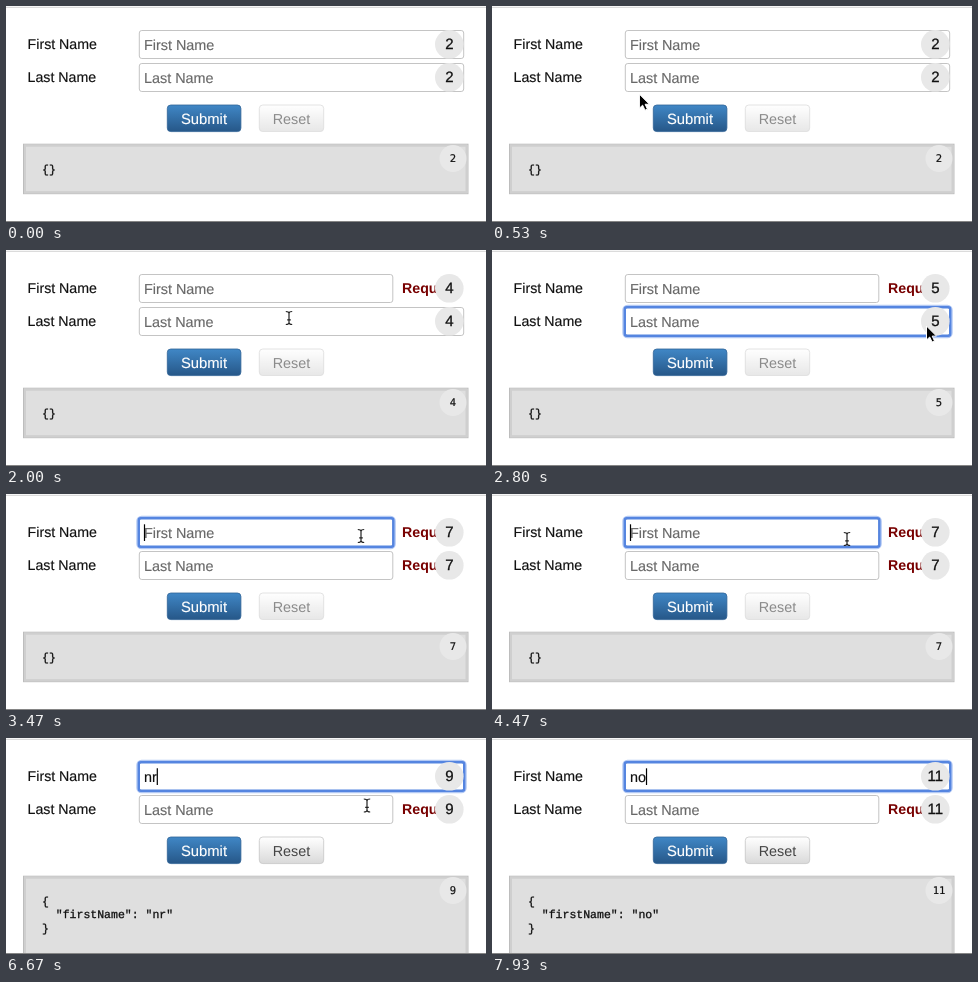
These frames come from a looping animation (480x216 px, 8000 ms). An HTML page:

```html
<!DOCTYPE html>
<html lang="en">
<head>
<meta charset="utf-8">
<title>Form validation</title>
<style>
  html, body { margin: 0; width: 480px; height: 216px; overflow: hidden; background: #fff; }
  svg { display: block; }
  text { font: 14.4px "Liberation Sans", Arial, sans-serif; fill: #111; white-space: pre;
    text-rendering: geometricPrecision; }
  .label { font-size: 14.2px; stroke: #111; stroke-width: .15px; }
  .hint { fill: #686868; stroke: #686868; stroke-width: .15px; }
  .value { stroke: #111; stroke-width: .15px; }
  .error { font-size: 14.2px; font-weight: bold; fill: #780000; }
  .mid { text-anchor: middle; }
  .count { font-size: 15px; stroke: #111; stroke-width: .3px; }
  .code { font: 11.5px "Liberation Mono", "Courier New", monospace; stroke: #111; stroke-width: .3px; }
  .small { font: 10.5px "DejaVu Sans Mono", monospace; stroke: #111; stroke-width: .2px; }
  .badge { fill: #e8e8e8; }
  .box { fill: #fff; stroke: #c4c4c4; }
  .ring { fill: none; stroke: #5585e0; stroke-width: 2.4; }
  .glow { fill: none; stroke: #b3c9f4; stroke-width: 4.4; }
</style>
</head>
<body>
<svg width="480" height="216" viewBox="0 0 480 216">
  <defs>
    <linearGradient id="blue" x2="0" y2="1">
      <stop stop-color="#4087c6"/><stop offset="1" stop-color="#265788"/>
    </linearGradient>
    <linearGradient id="gray" x2="0" y2="1">
      <stop stop-color="#fff"/><stop offset="1" stop-color="#d9d9d9"/>
    </linearGradient>
    <clipPath id="cut"><path d="M0 0H448V216H0Z"/></clipPath>
  </defs>
  <path d="M0 1.3H480" stroke="#d2d2d2"/>

  <text class="label" x="21.6" y="43">First Name</text>
  <text class="label" x="21.6" y="76">Last Name</text>
  <g id="fields"></g>

  <rect x="161.3" y="99" width="73.6" height="26.6" rx="3.5" fill="url(#blue)" stroke="#2f6296" stroke-width=".8"/>
  <text class="mid" x="198" y="117.8" style="font-size:14.8px;fill:#fff;stroke:#fff;stroke-width:.15px">Submit</text>
  <g id="reset">
    <rect x="253.3" y="99" width="64.4" height="26.6" rx="3.5" fill="url(#gray)" stroke="#c6c6c6" stroke-width=".8"/>
    <text class="mid" x="285.5" y="117.8" style="fill:#444">Reset</text>
  </g>

  <g id="panel">
    <rect id="back" x="17.5" y="138.2" width="444.5" fill="#dfdfdf" stroke="#bdbdbd"/>
    <rect id="shade" x="19" y="139.7" width="441.5" fill="none" stroke="#cfcfcf" stroke-width="2"/>
    <text class="code" x="36" y="166.7"></text>
    <text class="code" x="36" y="180.2"></text>
    <text class="code" x="36" y="193.8"></text>
    <circle class="badge" cx="447" cy="152.5" r="13.5"/>
    <text class="small mid" x="447" y="156.2"></text>
  </g>
  <path d="M0 215.5H480" stroke="#858585"/>

  <path id="caret" stroke="#000" stroke-width="1.2"/>
  <path id="beam" d="M-3.2 -6.5Q0 -6.5 0 -4.5Q0 -6.5 3.2 -6.5M0 -5V5M-3.2 6.5Q0 6.5 0 4.5Q0 6.5 3.2 6.5M-1.8 1.8H1.8"
        fill="none" stroke="#222" stroke-width="1.2"/>
  <path id="arrow" d="M0 0V14L3.2 11L5.6 16L8 15L5.7 10.1H10Z" fill="#000" stroke="#fff"/>
</svg>
<script>
const LOOP = 8000, STEP = 1000 / 15;

// time, renders, focused field, first error, last error, typed value
const STATES = [
  [0, 2, 0, 0, 0, ''],
  [1000, 3, 1, 0, 0, ''],
  [2000, 4, 0, 1, 0, ''],
  [2067, 5, 2, 1, 0, ''],
  [3467, 7, 1, 1, 1, ''],
  [4800, 8, 1, 0, 1, 'n'],
  [5467, 9, 1, 0, 1, 'nr'],
  [7467, 10, 1, 0, 1, 'n'],
  [7933, 11, 1, 0, 1, 'no']
];
const CARET_ON = [[1000, 1467], [2067, 2533], [3000, 3267], [3467, 3933],
  [4467, 5267], [5467, 5933], [6467, 6933], [7467, 8000]];
const POINTER_ON = [[133, 4800], [5800, 7467]];
const POINTER = [
  [133, 118, 113], [400, 142, 100], [867, 169, 41], [1400, 169, 41],
  [1733, 283, 68], [2400, 283, 68], [2667, 445, 77], [2800, 434.5, 76],
  [2867, 434.5, 76], [3267, 355, 42], [3667, 355, 42], [3933, 355, 45],
  [6400, 355, 45], [6667, 361, 67.5], [7000, 361, 67.5], [7067, 365, 63]
];

const $ = id => document.getElementById(id);
const set = (el, attrs) => { for (const k in attrs) el.setAttribute(k, attrs[k]); };
const show = (el, on) => set(el, { visibility: on ? 'visible' : 'hidden' });
const within = (spans, t) => spans.some(([a, b]) => t >= a && t < b);

function makeField(hint, y) {
  const g = document.createElementNS('http://www.w3.org/2000/svg', 'g');
  g.innerHTML = `
    <rect class="glow" x="132.5" y="${y}" height="29" rx="3"/>
    <rect class="box" x="133.3" y="${y + .5}" height="28" rx="2.5"/>
    <rect class="ring" x="132.8" y="${y + .3}" height="28.4" rx="2"/>
    <text class="hint" x="138" y="${y + 20}">${hint}</text>
    <text class="value" x="138" y="${y + 20}"></text>
    <text class="error" x="396" y="${y + 19}" clip-path="url(#cut)">Required</text>
    <circle class="badge" cx="443.3" cy="${y + 14.3}" r="14.3"/>
    <text class="count mid" x="443.4" y="${y + 19.2}"></text>`;
  $('fields').append(g);
  const part = name => g.querySelector('.' + name);
  return { y, part, draw(count, focused, error, value) {
    const width = error ? 253.5 : 324.4;
    set(part('box'), { width });
    set(part('ring'), { width: width + 1 });
    set(part('glow'), { width: width + 1.6 });
    show(part('ring'), focused);
    show(part('glow'), focused);
    show(part('hint'), !value);
    show(part('error'), error);
    part('value').textContent = value;
    part('count').textContent = count;
  } };
}
const fields = [makeField('First Name', 24), makeField('Last Name', 57)];

function drawPanel(count, value) {
  const height = value ? 90 : 49.5;
  const lines = value ? ['{', `  "firstName": "${value}"`, '}'] : ['{}', '', ''];
  set($('back'), { height });
  set($('shade'), { height: height - 3 });
  document.querySelectorAll('.code').forEach((el, i) => el.textContent = lines[i]);
  document.querySelector('.small').textContent = count;
}

function pointerAt(t) {
  const i = POINTER.findIndex(p => p[0] > t);
  if (i < 0) return POINTER[POINTER.length - 1].slice(1);
  if (!i) return POINTER[0].slice(1);
  const [a, ax, ay] = POINTER[i - 1], [b, bx, by] = POINTER[i];
  const u = (t - a) / (b - a), e = u * u * (3 - 2 * u);
  return [ax + (bx - ax) * e, ay + (by - ay) * e];
}

function drawPointer(t, wide) {
  const [x, y] = pointerAt(t), on = within(POINTER_ON, t);
  const inField = fields.some((f, i) =>
    x > 133 && x < (wide[i] ? 430 : 387) && y > f.y && y < f.y + 29);
  for (const id of ['beam', 'arrow']) {
    set($(id), { transform: `translate(${x} ${y})` });
    show($(id), on && inField === (id === 'beam'));
  }
}

function render(ms) {
  const t = Math.floor((ms + 5) / STEP) * STEP + 1;
  const [, count, focus, err1, err2, value] = STATES.filter(s => s[0] <= t).pop();
  fields[0].draw(count, focus === 1, err1, value);
  fields[1].draw(count, focus === 2, err2, '');
  set($('reset'), { opacity: value ? 1 : .62 });
  drawPanel(count, value);

  show($('caret'), focus && within(CARET_ON, t));
  if (focus) {
    const f = fields[focus - 1];
    const x = 138.5 + f.part('value').getComputedTextLength();
    set($('caret'), { d: `M${x} ${f.y + 6.3}V${f.y + 23}` });
  }
  drawPointer(t, [!err1, !err2]);
}

const start = performance.now();
function tick() {
  render((performance.now() - start) % LOOP);
  requestAnimationFrame(tick);
}
tick();
</script>
</body>
</html>
```
